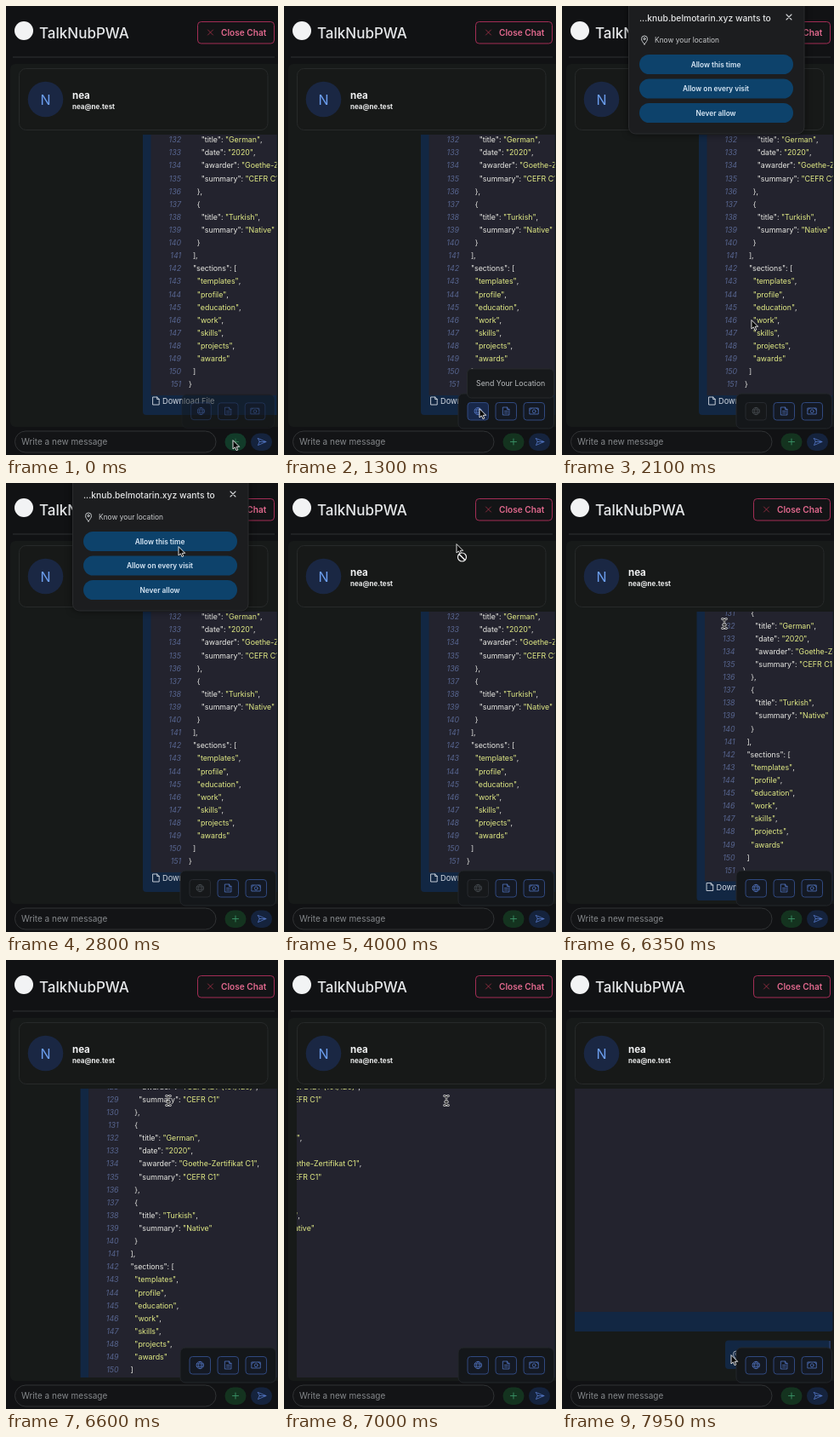
These frames come from a looping animation (320x527 px, 8 s). An HTML page with a canvas:

```html
<!DOCTYPE html>
<html lang="en">
<head>
<meta charset="utf-8">
<title>Chat</title>
<style>
html, body { margin: 0; width: 100%; height: 100%; overflow: hidden; background: #111214; }
canvas { display: block; width: 320px; height: 527px; }
</style>
</head>
<body>
<canvas id="stage"></canvas>
<script>
const W = 320, H = 527, LOOP = 8000;
const canvas = document.getElementById('stage');
const ctx = canvas.getContext('2d');
const dpr = window.devicePixelRatio || 1;
canvas.width = W * dpr;
canvas.height = H * dpr;

const FONT = 'Inter, "Open Sans", sans-serif';
const BLUE = '#5579c9';
const LINE_H = 15.11;
const FIRST_LINE = 127;
const CODE = `      "date": "2021",
      "awarder": "TOEFL iBT (101/120)",
      "summary": "CEFR C1"
    },
    {
      "title": "German",
      "date": "2020",
      "awarder": "Goethe-Zertifikat C1",
      "summary": "CEFR C1"
    },
    {
      "title": "Turkish",
      "summary": "Native"
    }
  ],
  "sections": [
    "templates",
    "profile",
    "education",
    "work",
    "skills",
    "projects",
    "awards"
  ]
}`.split('\n');

const POINTER = [
  [0, 267, 510], [450, 267, 510], [1050, 230, 473], [1900, 230, 473],
  [2500, 203, 75], [3000, 203, 75], [3100, 203, 72], [5700, 203, 72],
  [6150, 191, 165], [7640, 191, 165], [7900, 199, 464]
];

const between = (t, a, b) => t >= a && t < b;
function ease(t, a, b) {
  const u = Math.min(1, Math.max(0, (t - a) / (b - a)));
  return u * u * (3 - 2 * u);
}
function pointerAt(t) {
  const i = POINTER.findIndex(p => p[0] > t);
  if (i < 0) return POINTER[POINTER.length - 1].slice(1);
  const [a, b] = [POINTER[i - 1], POINTER[i]];
  const k = ease(t, a[0], b[0]);
  return [a[1] + (b[1] - a[1]) * k, a[2] + (b[2] - a[2]) * k];
}

function box(x, y, w, h, r, fill, stroke) {
  ctx.beginPath();
  ctx.roundRect(x, y, w, h, r);
  if (fill) { ctx.fillStyle = fill; ctx.fill(); }
  if (stroke) { ctx.strokeStyle = stroke; ctx.lineWidth = 1; ctx.stroke(); }
}
function disc(x, y, r, fill) {
  ctx.beginPath();
  ctx.arc(x, y, r, 0, Math.PI * 2);
  ctx.fillStyle = fill;
  ctx.fill();
}
// y is the vertical centre of the capitals
function text(s, x, y, size, color, weight = 400, align = 'left') {
  ctx.font = `${weight} ${size}px ${FONT}`;
  ctx.textAlign = align;
  ctx.fillStyle = color;
  ctx.fillText(s, x, y + size * 0.364);
}
function stroke(path, x, y, color, width = 1) {
  ctx.save();
  ctx.translate(x, y);
  ctx.strokeStyle = color;
  ctx.lineWidth = width;
  ctx.lineJoin = ctx.lineCap = 'round';
  ctx.stroke(new Path2D(path));
  ctx.restore();
}
function faded(alpha, draw) {
  if (alpha <= 0) return;
  ctx.save();
  ctx.globalAlpha = alpha;
  draw();
  ctx.restore();
}

const ICON = {
  globe: 'M4.2 0A4.2 4.2 0 1 1-4.2 0A4.2 4.2 0 1 1 4.2 0M-3.9-1.5H3.9M-3.9 1.5H3.9M0-4.2C-2.6-2-2.6 2 0 4.2C2.6 2 2.6-2 0-4.2',
  file: 'M-3.5-4.5H1.2L3.7-2V4.5H-3.5ZM1.2-4.5V-2H3.7',
  fileLines: 'M-1.8 0H2M-1.8 2.2H2',
  photo: 'M-5-3.5H5V3.5H-5ZM1.9 .2A1.9 1.9 0 1 1-1.9 .2A1.9 1.9 0 1 1 1.9 .2M-5-1.2L-2.8-3.5M5-1.2L2.8-3.5',
  plus: 'M-3.5 0H3.5M0-3.5V3.5',
  send: 'M-4.5-4L5 0L-4.5 4L-2.8 0ZM-2.8 0H5',
  close: 'M-3-3L3 3M3-3L-3 3',
  pin: 'M0 5C-2 2-3.5 .8-3.5-1.5A3.5 3.5 0 1 1 3.5-1.5C3.5 .8 2 2 0 5ZM1.2-1.5A1.2 1.2 0 1 1-1.2-1.5A1.2 1.2 0 1 1 1.2-1.5'
};

function header() {
  disc(21, 29, 11, '#f2f3f4');
  text('TalkNubPWA', 39, 32, 17, '#e6e8ea', 500);
  box(225.5, 18.5, 90, 25.5, 4, '#131416', '#a32d55');
  stroke(ICON.close, 240.5, 31, '#a83048', 0.8);
  text('Close Chat', 253, 31, 10.1, '#e2698e', 600);
  ctx.fillStyle = '#303335';
  ctx.fillRect(8, 59.5, 308, 1);
}

function codeLine(line, x, y) {
  const body = line.trimStart();
  x += (line.length - body.length) * 2.45;
  for (const part of body.split(/("[^"]*":?)/)) {
    const isValue = part[0] === '"' && !part.endsWith(':');
    text(part, x, y, 8.8, isValue ? '#e3ec86' : '#e9e9e4');
    x += ctx.measureText(part).width;
  }
}

function messages(t) {
  const dx = -400 * ease(t, 6300, 7400);
  const dy = 52 * ease(t, 6250, 6600) - 96 * ease(t, 7640, 7920);
  ctx.save();
  ctx.beginPath();
  ctx.rect(15, 151, 303.5, 339);
  ctx.clip();
  ctx.translate(dx, dy);
  box(161, -400, 558, 880, 4, '#122743');
  ctx.fillStyle = '#23232e';
  ctx.fillRect(170.5, -400, 549, 857);
  CODE.forEach((line, i) => {
    const n = FIRST_LINE + i;
    const y = 157 + (n - 132) * LINE_H;
    text(String(n), 206, y, 8.8, '#57658f', 'italic 400', 'right');
    codeLine(line, 215, y);
  });
  stroke(ICON.file, 176.5, 463.5, '#d5dbe4', 0.9);
  text('Download File', 184, 464, 9.2, '#d5dbe4');
  box(592, 490.5, 124, 33.5, 4, '#122743');
  stroke(ICON.pin, 605, 508, '#c5cbd6', 0.8);
  text('Open Location', 614, 507.5, 9.2, '#d5dbe4');
  ctx.fillStyle = '#22365c';
  ctx.fillRect(714, 491, 2, 9);
  ctx.restore();
}

function chat(t) {
  box(5, 68, 330, 426, 6, '#171a19');
  messages(t);
  box(15.5, 73.5, 292.5, 72, 8, '#171918', '#272a2a');
  disc(46.5, 109.5, 20.8, '#1a2743');
  text('N', 46.5, 110, 16, '#6c9ff0', 400, 'center');
  text('nea', 78, 104.5, 11.5, '#f1f2f3', 700);
  text('nea@ne.test', 78, 118, 8, '#eceded', 700);
}

function footer(t) {
  box(10.5, 499, 236.5, 25, 12.5, '#131416', '#313335');
  text('Write a new message', 18, 511.5, 10, '#85888b');
  const hot = t < 550;
  box(257.5, 501.5, 25, 20.5, 10.25, hot ? '#123b29' : '#14331f');
  stroke(ICON.plus, 270, 511.5, hot ? '#2f7350' : '#3a9468', 0.9);
  box(288, 501.5, 25, 20.5, 10.25, '#15233d');
  stroke(ICON.send, 301, 511.5, BLUE, 0.8);
}

function menuButton(x, icons, state) {
  const off = state === 'off';
  const fill = off ? '#16181a' : state === 'hot' ? '#18284a' : '#141923';
  box(x, 465.5, 24.5, 20.5, 3.5, fill, off ? '#272a2f' : '#30497f');
  icons.forEach(d => stroke(d, x + 12.25, 475.5, off ? '#4a4f55' : BLUE, 0.75));
}

function menu(t) {
  const k = ease(t, -100, 200);
  const scale = 0.95 + 0.05 * k;
  faded(0.3 + 0.7 * k, () => {
    ctx.translate(261, 476);
    ctx.scale(scale, scale);
    ctx.translate(-261, -476);
    box(205, 455, 112.5, 41, 6, '#14171a', '#23262a');
    const state = between(t, 1800, 5900) ? 'off' : between(t, 950, 1800) ? 'hot' : '';
    menuButton(216, [ICON.globe], state);
    menuButton(249, [ICON.file, ICON.fileLines]);
    menuButton(282, [ICON.photo]);
  });
  faded(ease(t, 1050, 1250) - ease(t, 1800, 1950), () => {
    box(215.5, 426, 102, 34, 5, '#17191b', '#26292b');
    text('Send Your Location', 226, 443, 8.8, '#b9bcbe');
  });
}

function prompt(t) {
  if (!between(t, 2050, 3100)) return;
  ctx.save();
  ctx.shadowColor = 'rgba(0,0,0,.6)';
  ctx.shadowBlur = 8 * dpr;
  box(78.5, -12, 206.5, 162, 8, '#1c1d1f');
  ctx.restore();
  box(78.5, -12, 206.5, 162, 8, null, '#2b2c2e');
  text('...knub.belmotarin.xyz wants to', 91, 14, 10.3, '#e4e5e6', 500);
  stroke(ICON.close, 267, 13, '#d4d6d8', 1.1);
  stroke(ICON.pin, 97, 40, '#c5c8ca', 1);
  text('Know your location', 109, 40, 8.4, '#c9cbcd');
  ['Allow this time', 'Allow on every visit', 'Never allow'].forEach((label, i) => {
    const y = 57 + i * 28.5;
    box(91, y, 181, 23, 11.5, '#0d426b');
    text(label, 181, y + 11.5, 8.3, '#d9e8f6', 600, 'center');
  });
}

function pointer(t) {
  const [x, y] = pointerAt(t);
  if (between(t, 6120, 7680)) {
    const beam = 'M-2.5-5.5Q0-5.5 0-4V4Q0 5.5-2.5 5.5M2.5-5.5Q0-5.5 0-4M0 4Q0 5.5 2.5 5.5M-1.5 1.5H1.5';
    stroke(beam, x, y, '#f4f4f4', 2.4);
    stroke(beam, x, y, '#111', 1);
    return;
  }
  const arrow = 'M0 0V10L2.4 7.9L4.1 11.7L5.8 10.9L4.2 7.3H7.3Z';
  ctx.save();
  ctx.translate(x, y);
  ctx.fillStyle = '#050505';
  ctx.fill(new Path2D(arrow));
  ctx.restore();
  stroke(arrow, x, y, '#f2f2f2', 0.9);
  if (between(t, 3100, 5750)) {
    disc(x + 6.5, y + 15, 5.6, '#f0f0f0');
    disc(x + 6.5, y + 15, 4.4, '#161616');
    stroke('M-3.2-3.2L3.2 3.2', x + 6.5, y + 15, '#f0f0f0', 1.6);
  }
}

function draw(t) {
  ctx.setTransform(dpr, 0, 0, dpr, 0, 0);
  ctx.fillStyle = '#111214';
  ctx.fillRect(0, 0, W, H);
  header();
  chat(t);
  footer(t);
  menu(t);
  prompt(t);
  pointer(t);
}

const start = performance.now();
function tick() {
  draw((performance.now() - start) % LOOP);
  requestAnimationFrame(tick);
}
tick();
</script>
</body>
</html>
```
